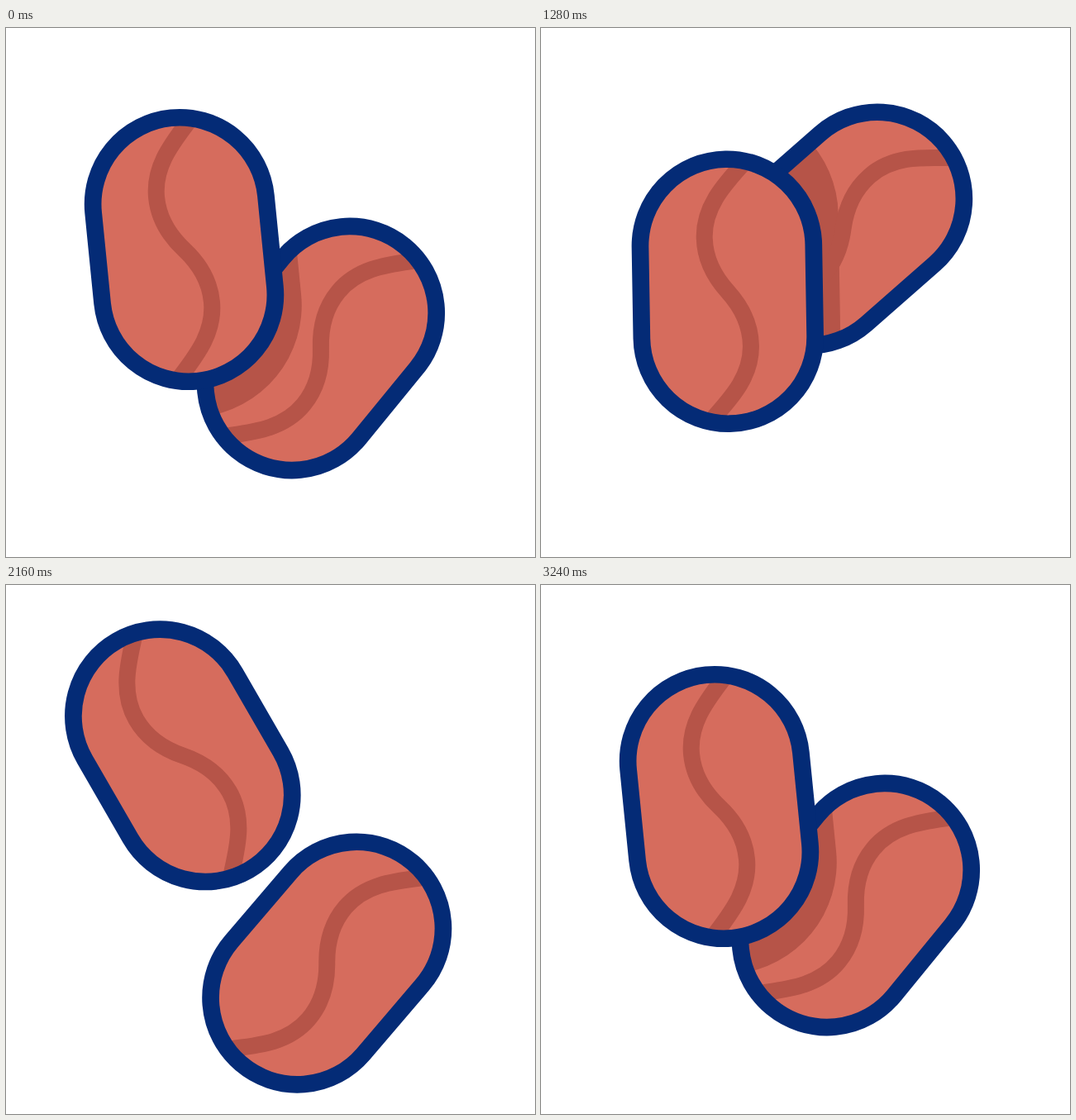
These frames come from a looping animation (640 px wide and 640 px high, 3560 ms). An HTML page:

```html
<!DOCTYPE html>
<html lang="en">
<head>
<meta charset="utf-8">
<title>Beans</title>
<style>
  html, body { margin: 0; width: 100%; height: 100%; overflow: hidden; background: #fff; }
  svg { display: block; width: 100%; height: 100%; }
  .skin { fill: #d66c5d; }
  .rim { fill: none; stroke: #042b76; stroke-width: 20.7; }
  .crease { fill: none; stroke: #b65448; stroke-width: 20; }
  .shade { stroke: #b65448; stroke-width: 271; stroke-linecap: round; }
</style>
</head>
<body>
<svg viewBox="0 0 640 640">
  <defs>
    <rect id="pill" x="-104.9" y="-160" width="209.8" height="320" rx="104.9"/>
    <path id="fold" d="M21-154C-1-130-27-104-27-66C-27-38-14-16 0 0C14 16 27 38 27 66C27 104 1 130-21 154"/>
    <clipPath id="inside"><use href="#pill"/></clipPath>
  </defs>
  <g id="back">
    <use href="#pill" class="skin"/>
    <g clip-path="url(#inside)"><line id="shade" class="shade" y1="-91" y2="68"/></g>
    <use href="#fold" class="crease"/>
    <use href="#pill" class="rim"/>
  </g>
  <g id="front">
    <use href="#pill" class="skin"/>
    <use href="#fold" class="crease"/>
    <use href="#pill" class="rim"/>
  </g>
</svg>
<script>
const LOOP = 3560, STEP = 20;

// Swings between resting poses { t, v, skew }; skew above 1 delays the swing into that pose.
function swing(...poses) {
  return t => {
    const i = poses.findIndex(p => p.t > t);
    if (i <= 0) return poses[i ? poses.length - 1 : 0].v;
    const from = poses[i - 1], to = poses[i];
    const u = ((t - from.t) / (to.t - from.t)) ** to.skew;
    const k = (1 - Math.cos(Math.PI * u)) / 2;
    return from.v.map((a, j) => a + (to.v[j] - a) * k);
  };
}
const at = (t, v, skew = 1) => ({ t, v, skew });

const frontRest = [215.5, 268], backRest = [380.9, 387.5];

const frontPlace = swing(at(180, frontRest), at(880, [216, 224.5]),
  at(1500, [232, 378], 1.27), at(2180, [213.8, 206]), at(2845, frontRest));
const frontTurn = swing(at(180, [-5.7]), at(1050, [-14]),
  at(1777, [62.5], 1.135), at(2260, [-40.5]), at(3240, [-5.7], 0.82));

const backPlace = swing(at(180, backRest), at(746, [388.5, 459.5]),
  at(1330, [365.1, 239]), at(2186, [388.3, 458], 0.93), at(2830, backRest));
const backTurn = swing(at(180, [39.3]), at(1010, [66], 2),
  at(1676, [-26], 1.39), at(2470, [69], 0.93), at(3240, [39.3]));

const [back, front, shade] = ["back", "front", "shade"].map(id => document.getElementById(id));
const move = (node, pose) => node.setAttribute("transform", pose);

function draw(t) {
  const [x, y] = backPlace(t), turn = backTurn(t);
  const pose = `translate(${frontPlace(t)}) rotate(${frontTurn(t)})`;
  move(front, pose);
  move(back, `translate(${x} ${y}) rotate(${turn})`);
  move(shade, `rotate(${-turn}) translate(${-x} ${-y}) ${pose}`);
}

const start = performance.now();
function tick() {
  const t = (performance.now() - start) % LOOP;
  draw(Math.floor(t / STEP) * STEP);
  requestAnimationFrame(tick);
}
draw(0);
requestAnimationFrame(tick);
</script>
</body>
</html>
```
